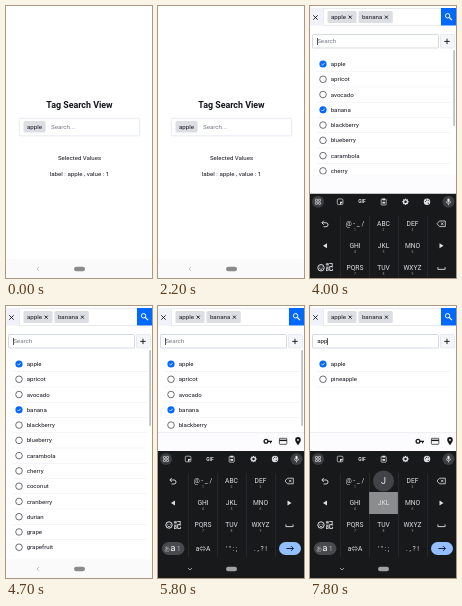
Recreate the animation shown at these times as an HTML page with a canvas. Size 146 by 272 pixels, loop 8000 ms.

```html
<!DOCTYPE html>
<html lang="en">
<head>
<meta charset="utf-8">
<title>Tag search</title>
<style>
  html, body { margin: 0; width: 100%; height: 100%; overflow: hidden; background: #fff; }
  canvas { display: block; width: 146px; height: 272px; }
</style>
</head>
<body>
<canvas id="stage"></canvas>
<script>
const W = 146, H = 272, LOOP = 8000;
const canvas = document.getElementById('stage');
const c = canvas.getContext('2d');
const scale = window.devicePixelRatio || 1;
canvas.width = W * scale;
canvas.height = H * scale;

const INK = '#12141b', LIGHT = '#dfe1e4', DARK = '#18191a', BLUE = '#0069fc';
const FRUITS = ['apple', 'apricot', 'avocado', 'banana', 'blackberry', 'blueberry', 'carambola',
  'cherry', 'coconut', 'cranberry', 'durian', 'grape', 'grapefruit', 'pineapple'];
const KEYS = [
  ['@ - _ /', 'ABC', 'DEF'],
  ['GHI', 'JKL', 'MNO'],
  ['PQRS', 'TUV', 'WXYZ'],
  ['a⇔A', '\' " : ;', '. , ? !']
];
const COLS = [45, 73.5, 102.5], ROWS = [175, 197, 219, 242.5];
const PRESSES = [
  { from: 6100, to: 6400, col: 1, row: 0, letter: 'A' },
  { from: 6600, to: 6900, col: 0, row: 2, letter: 'P' },
  { from: 7200, to: 7400, col: 0, row: 2, letter: 'P' },
  { from: 7600, to: 8000, col: 1, row: 1, letter: 'J' }
];

const within = (t, a, b) => t >= a && t < b;
const progress = (t, a, b) => Math.min(1, Math.max(0, (t - a) / (b - a)));
const easeOut = p => 1 - (1 - p) ** 2;

function text(str, x, y, size = 6.2, color = INK, align = 'left', weight = 400) {
  c.font = `${weight} ${size}px Roboto, "Noto Sans CJK JP", sans-serif`;
  c.textAlign = align;
  c.textBaseline = 'alphabetic';
  c.fillStyle = color;
  c.fillText(str, x, y + size * 0.35);
}

function rect(x, y, w, h, fill, r = 0, stroke) {
  c.beginPath();
  c.roundRect(x, y, w, h, r);
  if (fill) { c.fillStyle = fill; c.fill(); }
  if (stroke) { c.strokeStyle = stroke; c.lineWidth = 0.7; c.stroke(); }
}

function disc(x, y, r, fill, stroke, width = 0.8) {
  c.beginPath();
  c.arc(x, y, r, 0, 7);
  if (fill) { c.fillStyle = fill; c.fill(); }
  if (stroke) { c.strokeStyle = stroke; c.lineWidth = width; c.stroke(); }
}

function path(color, width, d, x = 0, y = 0, fill) {
  c.save();
  c.translate(x, y);
  const p = new Path2D(d);
  c.lineWidth = width;
  c.strokeStyle = color;
  if (fill) { c.fillStyle = color; c.fill(p); } else c.stroke(p);
  c.restore();
}

function tag(label, x, y, closable) {
  c.font = '400 6.2px Roboto, sans-serif';
  const w = c.measureText(label).width;
  rect(x, y, w + (closable ? 14 : 7), closable ? 12 : 11.5, '#dcdee4', 1.5);
  text(label, x + 3.5, y + 5.5);
  if (closable) path(INK, 0.9, 'M-1.5-1.5L1.5 1.5M1.5-1.5L-1.5 1.5', x + w + 7.6, y + 6.2);
  return x + w + 15.8;
}

function nav(dark) {
  if (!dark) rect(0, 253, W, 19, '#fafafa');
  rect(68, 260.8, 11, 4.4, dark ? '#a2a2a3' : '#8b8b8d', 2.2);
  if (dark) path('#bbb', 0.8, 'M-2-1L0 1L2-1', 32, 263);
  else path('#b5b5b5', 0.8, 'M1-2L-1 0L1 2', 32, 263);
}

function home() {
  rect(0, 0, W, H, '#fff');
  text('Tag Search View', 73.5, 98.5, 8.9, INK, 'center', 700);
  rect(13.3, 112.3, 120.5, 17.5, '#fff', 1, '#dfe3ec');
  tag('apple', 17.5, 115, false);
  text('Search...', 45, 121, 6.2, '#777b84');
  text('Selected Values', 73.5, 152, 6.1, INK, 'center');
  text('label : apple , value : 1', 73.5, 167.5, 6.2, INK, 'center');
}

function modal(t, typed, listEnd) {
  const chosen = t >= 4000 ? ['apple', 'banana'] : ['apple'];
  rect(0, 0, W, H, '#fff');
  rect(0, 2, 131, 17.5, '#f1f2f9');
  path(INK, 0.9, 'M-2.2-2.2L2.2 2.2M2.2-2.2L-2.2 2.2', 5.5, 11.5);
  rect(13.5, 2.5, 117.5, 17, '#fff', 0, '#e2e5ed');
  chosen.reduce((x, name) => tag(name, x, 5, true), 17.5);
  rect(131, 2, 15, 17.5, BLUE);
  disc(137.6, 9.8, 2.2, null, '#fff', 1);
  path('#fff', 1.1, 'M139.3 11.5L142 14.2');

  rect(2.5, 28.5, 126, 13.5, '#fff', 1, '#c3cad6');
  rect(130.5, 28.5, 14, 13.5, '#f5f6fa', 1, '#e0e4ec');
  path(INK, 0.9, 'M-2.7 0H2.7M0-2.7V2.7', 137, 35.4);
  text(typed || 'Search', 7.2, 35.1, 6.2, typed ? INK : '#777b84');
  const end = 7 + (typed ? c.measureText(typed).width : 0);
  const blink = within(t, 2500, 3200) || within(t, 3600, 4200) || within(t, 4700, 5300) || t >= 5800;
  if (blink) rect(end, 32, 0.7, 7, INK);

  c.save();
  c.beginPath();
  c.rect(0, 44, W, listEnd - 44);
  c.clip();
  FRUITS.filter(name => name.includes(typed)).forEach((name, i) => {
    const y = 58 + i * 15.27;
    if (chosen.includes(name)) {
      disc(13, y, 3.6, BLUE);
      path('#fff', 0.8, 'M-1.6 0L-.4 1.2L1.7-1.1', 13, y);
    } else disc(13, y, 3.3, null, INK, 0.6);
    text(name, 20.7, y, 6.1);
    rect(6, y + 7.4, 135, 0.5, '#eceef2');
  });
  if (typed.length < 2) rect(143.4, 44, 1.4, 76, '#aeafb2', 0.7);
  c.restore();
}

// Strip above the keyboard; its icons show once the keyboard has settled.
function autofill(y, icons) {
  rect(0, y, W, 19, '#fcfcfe');
  if (!icons) return;
  rect(0, y, W, 0.5, '#e1e3e8');
  const m = y + 9.3, color = '#17181b';
  disc(108, m, 1.9, null, color, 1.3);
  path(color, 1.3, 'M109.8 0H114M112.6 0V2', 0, m);
  rect(121.4, m - 3, 7.4, 6, null, 0.6, color);
  rect(121.4, m - 1.6, 7.4, 1.4, color);
  path(color, 1, 'M0 4C-2 1-2.8 0-2.8-1.4A2.8 2.8 0 0 1 2.8-1.4C2.8 0 2 1 0 4Z', 140, m, true);
  disc(140, m - 1.4, 0.9, '#fcfcfe');
}

function toolbar() {
  const y = 153;
  disc(8, y, 6, '#3b3d40');
  disc(138.5, y, 6, '#3b3d40');
  for (const [dx, dy] of [[-2.6, -2.6], [0.4, -2.6], [-2.6, 0.4], [0.4, 0.4]])
    rect(8 + dx, y + dy, 2.1, 2.1, null, 0.4, LIGHT);
  rect(27.3, y - 2.8, 5.6, 5.6, null, 1, LIGHT);
  path(LIGHT, 1, 'M0 3V0H3Z', 30, y, true);
  text('GIF', 52, y, 4.8, LIGHT, 'center', 700);
  rect(71.2, y - 2.6, 5, 5.8, null, 0.5, LIGHT);
  rect(72.4, y - 3.2, 2.6, 1.8, LIGHT);
  rect(72.4, y, 2.6, 1.8, LIGHT);
  for (let i = 0; i < 8; i++) {
    const a = i * Math.PI / 4;
    disc(95.5 + 2.6 * Math.cos(a), y + 2.6 * Math.sin(a), 0.7, LIGHT);
  }
  disc(95.5, y, 1.9, null, LIGHT, 1.3);
  disc(117, y, 3.2, LIGHT);
  for (const [dx, dy] of [[-1.6, -0.3], [-0.5, -1.7], [1.2, -1.4], [1.3, 1.4]])
    disc(117 + dx, y + dy, 0.55, DARK);
  rect(137.4, y - 3.3, 2.2, 4, LIGHT, 1.1);
  path(LIGHT, 0.7, 'M-2.2-.4A2.2 2.2 0 0 0 2.2-.4M0 1.8V3.4', 138.5, y);
}

function candidates(letter) {
  text(letter, 16, 130.5, 6.2, LIGHT, 'center');
  text('—', 57, 130.5, 6.2, '#a5a7aa', 'center');
  text('ゃ', 105.5, 129.5, 7, LIGHT, 'center');
  rect(37, 127, 0.5, 7, '#3a3c3f');
  rect(77, 127, 0.5, 7, '#3a3c3f');
  path(LIGHT, 0.9, 'M-2-1L0 1L2-1', 138.5, 130);
}

function keyboard(t, offset, composing, top) {
  c.save();
  c.translate(0, offset);
  rect(0, top, W, H - top, DARK);
  if (composing) candidates(composing);
  else toolbar();

  for (const x of [30, 59, 88, 117]) rect(x, 167, 0.5, 84, '#35373a');
  const press = PRESSES.find(p => within(t, p.from, p.to));
  if (press) rect(COLS[press.col] - 14.4, ROWS[press.row] - 11, 28.8, 22, '#8b8c8e');
  KEYS.forEach((row, r) => row.forEach((label, i) => {
    text(label, COLS[i], ROWS[r], 6.7, LIGHT, 'center');
    if (r < 3) text(r * 3 + i + 1, COLS[i], ROWS[r] + 6, 3.4, '#9a9c9f', 'center');
  }));

  path(LIGHT, 0.9, 'M-3-1H1A2 2 0 0 1 1 3H-1.5M-1.2-3L-3.2-1L-1.2 1', 15, 175);
  path(LIGHT, 0.8, 'M-4 0L-1.5-2.8H4.3V2.8H-1.5ZM0-1.2L2.4 1.2M2.4-1.2L0 1.2', 131, 175);
  path(LIGHT, 1, 'M2-2.4V2.4L-2 0Z', 15, 197, true);
  path(LIGHT, 1, 'M-2-2.4V2.4L2 0Z', 131.5, 197, true);
  disc(11, 219, 3.2, null, LIGHT, 1);
  disc(9.9, 218.2, 0.5, LIGHT);
  disc(12.1, 218.2, 0.5, LIGHT);
  path(LIGHT, 0.8, 'M-1.5.6A1.6 1.6 0 0 0 1.5.6', 11, 219);
  text('記', 15.5, 219, 7.8, LIGHT, 'left', 700);
  path(LIGHT, 0.9, 'M-3.6-.6V1.6H3.6V-.6', 131.5, 219);

  rect(4, 236, 22.5, 13, '#47494c', 6.5);
  text('あ', 6, 242.6, 6, '#b5b7ba');
  text('a', 14.8, 241.8, 9.6, '#fff', 'center');
  text('1', 20.8, 242.6, 7, '#b5b7ba', 'center');
  rect(121, 236, 22, 13, '#93bfff', 6.5);
  path('#14233c', 1, 'M-3.6 0H3.4M1-2.4L3.4 0L1 2.4', 132, 242.5);

  if (press) {
    const x = COLS[press.col], y = ROWS[press.row] - 22;
    disc(x, y, 10.5, '#414347');
    text(press.letter, x, y, 9, '#eceef0', 'center');
  }
  c.restore();
}

function draw(t) {
  c.setTransform(scale, 0, 0, scale, 0, 0);
  const typed = t < 6400 ? '' : t < 6900 ? 'a' : t < 7400 ? 'ap' : 'app';
  const composing = within(t, 6400, 7600) ? typed.slice(-1) : '';
  const top = composing ? 121 : 145;
  const shown = t < 3900 ? easeOut(progress(t, 2450, 2860))
    : t < 5000 ? 1 - progress(t, 3900, 4200)
    : easeOut(progress(t, 5050, 5450));
  const offset = (1 - shown) * (H - 145);
  const stripY = top + offset - 19;
  const settled = within(t, 2900, 3900) || t >= 5500;

  if (t < 2500) home();
  if (t > 2200) {
    c.save();
    c.translate(0, H * (1 - easeOut(progress(t, 2200, 2500))));
    modal(t, typed, Math.min(249, stripY));
    c.restore();
  }
  if (shown < 1) nav(false);
  if (shown > 0) {
    autofill(stripY, settled);
    keyboard(t, offset, composing, top);
    if (shown > 0.95) nav(true);
  }
}

function tick(now) {
  draw(now % LOOP);
  requestAnimationFrame(tick);
}
requestAnimationFrame(tick);
</script>
</body>
</html>
```
